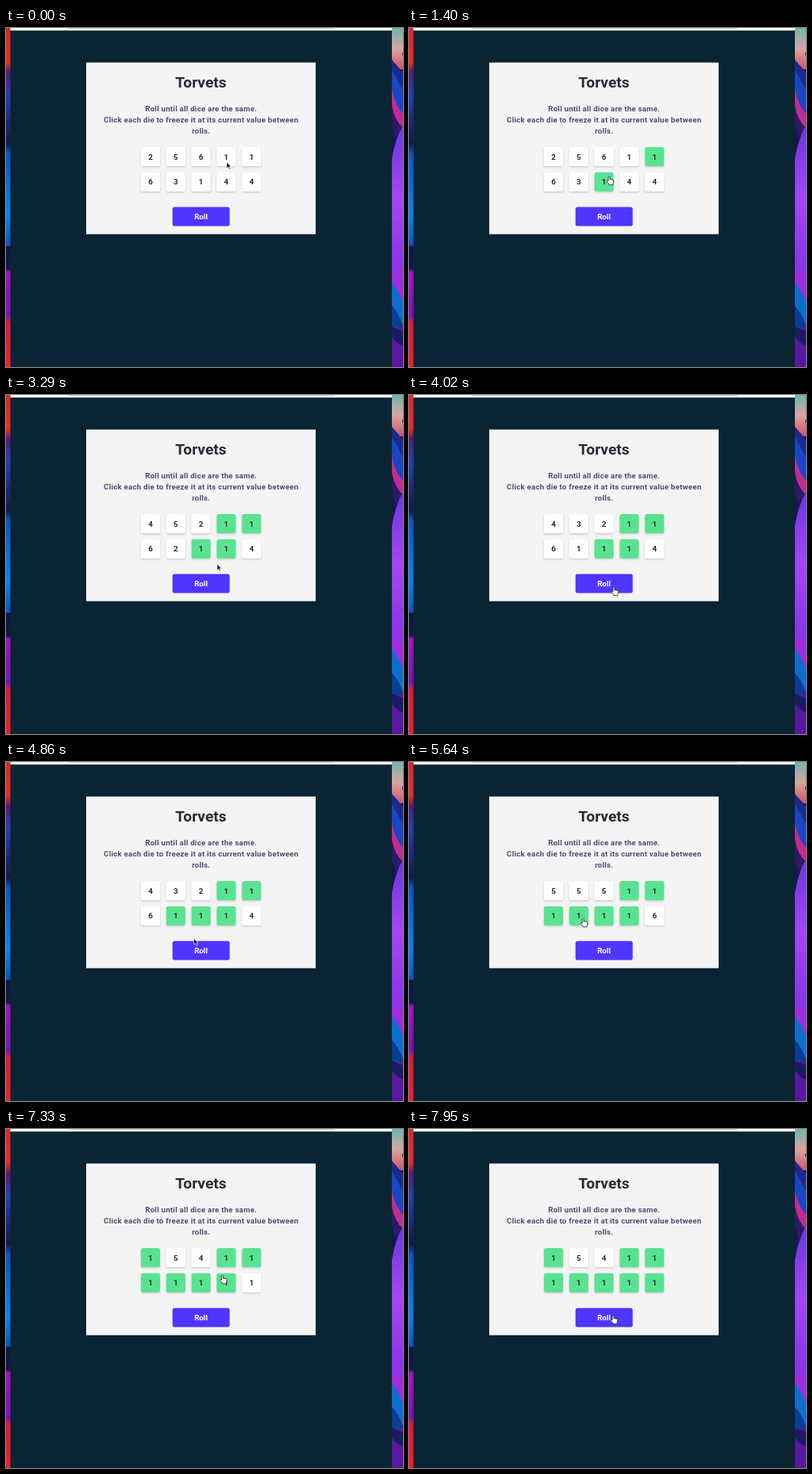
Animation, 500 px wide and 427 px high, one loop 8000 ms. Source, as an HTML page:

```html
<!DOCTYPE html>
<html lang="en">
<head>
<meta charset="utf-8">
<title>Dice game</title>
<style>
  html, body { margin: 0; width: 100%; height: 100%; overflow: hidden; background: #0b2434; }
  svg { display: block; width: 100vw; height: 100vh; }
  text { font-family: Roboto, "Open Sans", sans-serif; font-weight: 700; text-anchor: middle; }
  .title { font-size: 19.2px; fill: #2b283a; }
  .info { font-size: 9.7px; letter-spacing: .22px; fill: #4a4e74; }
  .num { font-size: 9.8px; fill: #2b283a; }
  .roll { font-size: 9.7px; fill: #fff; }
</style>
</head>
<body>
<svg id="stage" viewBox="0 0 500 427">
  <defs>
    <filter id="soft" x="-30%" y="-30%" width="160%" height="170%">
      <feDropShadow dx="0" dy="1.2" stdDeviation="1" flood-color="#000" flood-opacity=".2"/>
    </filter>
    <linearGradient id="left" x2="0" y2="1">
      <stop offset="0" stop-color="#d92a2a"/>
      <stop offset=".1" stop-color="#f02a20"/>
      <stop offset=".13" stop-color="#551b78"/>
      <stop offset=".2" stop-color="#2340b8"/>
      <stop offset=".34" stop-color="#121848"/>
      <stop offset=".37" stop-color="#0757c9"/>
      <stop offset=".55" stop-color="#0a83ef"/>
      <stop offset=".64" stop-color="#0a55c8"/>
      <stop offset=".645" stop-color="#0b1844"/>
      <stop offset=".71" stop-color="#101a4a"/>
      <stop offset=".72" stop-color="#a512c8"/>
      <stop offset=".85" stop-color="#7a14b8"/>
      <stop offset=".87" stop-color="#e01a3c"/>
      <stop offset="1" stop-color="#f0202a"/>
    </linearGradient>
    <linearGradient id="sky" x2="0" y2="1">
      <stop offset="0" stop-color="#6fb5ad"/>
      <stop offset=".5" stop-color="#d9a6a0"/>
      <stop offset="1" stop-color="#d0526a"/>
    </linearGradient>
    <linearGradient id="violet" x2="0" y2="1">
      <stop offset="0" stop-color="#6a35dc"/>
      <stop offset=".4" stop-color="#a546f5"/>
      <stop offset=".75" stop-color="#8a35e8"/>
      <stop offset="1" stop-color="#c01fd0"/>
    </linearGradient>
  </defs>

  <rect width="500" height="427" fill="#0b2434"/>
  <rect width="5.5" height="427" fill="url(#left)"/>
  <g>
    <rect x="486" width="14" height="427" fill="#111a4c"/>
    <rect x="486" width="14" height="52" fill="url(#sky)"/>
    <circle cx="502" cy="33" r="3" fill="#33242c"/>
    <path d="M486 40L500 56V78L486 52Z" fill="#1b2a8c"/>
    <path d="M486 52L500 78V112Q490 100 486 84Z" fill="#1747c4"/>
    <path d="M486 76Q490 98 500 108V126Q489 116 486 98Z" fill="#c22c8e"/>
    <path d="M486 100Q491 120 500 126V150Q490 140 486 122Z" fill="#2a1a68"/>
    <path d="M486 165Q490 140 500 122V352L486 322Z" fill="url(#violet)"/>
    <path d="M486 320Q495 330 500 346V376Q490 380 486 378Z" fill="#0c6fd0"/>
    <path d="M486 350Q494 358 500 374V380L486 376Z" fill="#0a3d94"/>
    <path d="M486 376Q494 380 500 376V427H486Z" fill="#5a17a0"/>
    <path d="M486 376L500 382V400Q490 396 486 388Z" fill="#1b1c60"/>
  </g>
  <rect x="5.5" width="480.5" height="3.2" fill="#fff"/>
  <rect x="78" y="-2" width="336" height="2.8" rx="1.4" fill="#c4c6c8"/>

  <rect x="101" y="43.5" width="289" height="216.2" fill="#f4f4f4"/>
  <text class="title" x="245.5" y="75">Torvets</text>
  <text class="info" x="245.7" y="104.6">Roll until all dice are the same.</text>
  <text class="info" x="245.7" y="119">Click each die to freeze it at its current value between</text>
  <text class="info" x="245.7" y="133.4">rolls.</text>
  <g id="dice"></g>
  <rect x="209.7" y="225.5" width="72" height="24" rx="2.5" fill="#5035ff"/>
  <text class="roll" x="245.6" y="241">Roll</text>

  <path id="arrow" d="M0 0V7.7L1.8 6.1L3.1 9L4.4 8.4L3.1 5.6H5.5Z" fill="#111" stroke="#fff" stroke-width=".6"/>
  <path id="hand" d="M-1 .6Q0-.8 1 .6V4L2.4 3.6L3.6 4.2L5 4.2Q6 4.6 5.9 6L5 9.2V10.6H-.2V9.4L-3 6.2Q-3 4.9-1.8 5.2L-1 6Z" fill="#fff" stroke="#222" stroke-width=".8" stroke-linejoin="round"/>
</svg>

<script>
const LOOP = 8000, SIZE = 24;
const $ = id => document.getElementById(id);

const rolls = [
  [0, "2561163144"], [1980, "4521162114"], [3760, "4321161114"],
  [5060, "5551111116"], [5955, "1541111111"]
];
// click time that freezes each die; dice 1 and 2 stay loose
const frozen = [6970, LOOP, LOOP, 1570, 1070, 5570, 4670, 1390, 3050, 7500];

// pointer stops: time, x, y and an optional rest
const path = [];
function stop(t, x, y, rest = 0) {
  path.push([t, x, y]);
  if (rest) path.push([t + rest, x, y]);
}
stop(0, 278, 169, 20);
stop(70, 280, 163, 720);
stop(1050, 309, 166, 40);
stop(1400, 252, 187, 80);
stop(1570, 276, 168, 30);
stop(1760, 247, 234, 480);
stop(2600, 250, 213);
stop(3020, 276, 192, 30);
stop(3560, 254, 238, 300);
stop(4020, 258, 242);
stop(4640, 214, 196, 30);
stop(5040, 257, 246, 40);
stop(5400, 183, 193, 170);
stop(5640, 219, 197);
stop(5940, 255, 238, 30);
stop(6360, 202, 169, 20);
stop(6520, 203, 165, 170);
stop(6950, 183, 165, 50);
stop(7480, 299, 190, 20);
stop(7930, 257, 235, 70);

const still = (a, b) => a[1] === b[1] && a[2] === b[2];

function slope(i, k) {
  const a = path[i - 1], p = path[i], b = path[i + 1];
  if (!a || !b || still(a, p) || still(p, b)) return 0;
  return (b[k] - a[k]) / (b[0] - a[0]);
}

function pointer(t, k) {
  let i = 0;
  while (i < path.length - 2 && t >= path[i + 1][0]) i++;
  const a = path[i], b = path[i + 1], d = b[0] - a[0];
  const u = (t - a[0]) / d, v = 1 - u;
  return a[k] * v * v * (1 + 2 * u) + b[k] * u * u * (3 - 2 * u)
    + d * u * v * (v * slope(i, k) - u * slope(i + 1, k));
}

function add(tag, attrs) {
  const el = document.createElementNS("http://www.w3.org/2000/svg", tag);
  for (const name in attrs) el.setAttribute(name, attrs[name]);
  return $("dice").appendChild(el);
}

const dice = frozen.map((when, i) => {
  const x = 170 + (i % 5) * 31.8, y = i < 5 ? 150 : 181.8;
  return {
    x, y, when,
    box: add("rect", { x, y, width: SIZE, height: SIZE, rx: 2.6, filter: "url(#soft)" }),
    num: add("text", { class: "num", x: x + SIZE / 2, y: y + 15.5 })
  };
});

const inside = (x, y, left, top, w, h) =>
  x >= left && x <= left + w && y >= top && y <= top + h;

function draw(t) {
  const values = rolls.filter(r => r[0] <= t).pop()[1];
  dice.forEach((die, i) => {
    die.box.setAttribute("fill", t >= die.when ? "#59e391" : "#fff");
    die.num.textContent = values[i];
  });
  const x = pointer(t, 1), y = pointer(t, 2);
  const over = t >= 45 && (inside(x, y, 209.7, 225.5, 72, 24) ||
    dice.some(d => inside(x, y, d.x, d.y, SIZE, SIZE)));
  const place = `translate(${x.toFixed(2)} ${y.toFixed(2)})`;
  $("hand").setAttribute("transform", place);
  $("arrow").setAttribute("transform", place);
  $("hand").style.display = over ? "" : "none";
  $("arrow").style.display = over ? "none" : "";
}

const start = performance.now();
function tick() {
  draw((performance.now() - start) % LOOP);
  requestAnimationFrame(tick);
}
draw(0);
requestAnimationFrame(tick);
</script>
</body>
</html>
```
